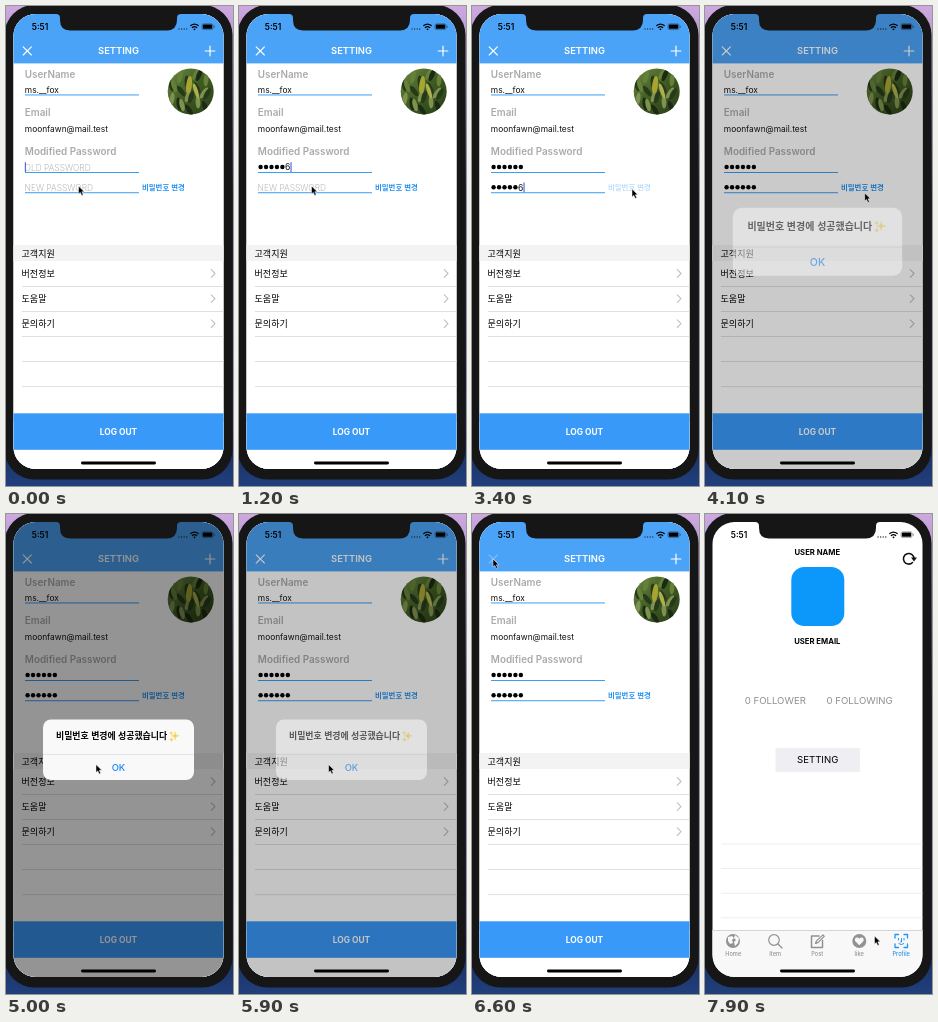
These frames come from a looping animation (227x480 px, 8000 ms). An HTML page:

```html
<!DOCTYPE html>
<html lang="ko">
<head>
<meta charset="utf-8">
<title>Settings screen</title>
<style>
  html, body { margin: 0; width: 100%; height: 100%; overflow: hidden; background: #161617; }
  svg { display: block; width: 100vw; height: 100vh; font-family: Inter, "Noto Sans CJK KR", "Noto Sans CJK", sans-serif; }
  .ko { font-family: "Noto Sans CJK KR", "Noto Sans CJK", "Noto Sans CJK JP", sans-serif; }
  .mid { text-anchor: middle; }
  .line { fill: none; stroke-linecap: round; stroke-linejoin: round; }
</style>
</head>
<body>
<svg id="stage" viewBox="0 0 227 480" xmlns="http://www.w3.org/2000/svg"></svg>
<script>
const LOOP = 8000;
const BLUE = '#2493f3';

// Markup helpers
const rect = (x, y, w, h, fill, extra = '') =>
  `<rect x="${x}" y="${y}" width="${w}" height="${h}" fill="${fill}" ${extra}/>`;
const circle = (x, y, r, fill, extra = '') =>
  `<circle cx="${x}" cy="${y}" r="${r}" fill="${fill}" ${extra}/>`;
const text = (x, y, size, weight, fill, content, cls = '', id = '') =>
  `<text x="${x}" y="${y}" font-size="${size}" font-weight="${weight}" fill="${fill}" class="${cls}" id="${id}">${content}</text>`;
const stroke = (d, color, width, extra = '') =>
  `<path class="line" d="${d}" stroke="${color}" stroke-width="${width}" ${extra}/>`;
const rule = (y, color = '#d2d2d5') => rect(16, y, 202, .7, color);

const fields = [
  { id: 'old', y: 161, hint: 'OLD PASSWORD', firstKey: 300, maskAt: 1700 },
  { id: 'new', y: 181.3, hint: 'NEW PASSWORD', firstKey: 1950, maskAt: 3600 }
];
const KEY_GAP = 150;
const DOT_STEP = 5.45;

function passwordField({ id, y, hint }) {
  const dots = Array.from({ length: 6 }, (_, i) =>
    circle(21.6 + i * DOT_STEP, y, 2.2, '#000', `class="${id}-dot"`)).join('');
  return text(18.6, y + 3.8, 8.4, 300, '#b9b9bc', hint, '', id + '-hint') + dots +
    text(0, y + 3.2, 8.6, 400, '#111', '', '', id + '-digit') +
    rect(19, y + 5, 114, .9, BLUE) +
    rect(0, y - 4.8, 1.1, 9.8, '#4463dc', `id="${id}-caret"`);
}

function avatar() {
  const leaves = Array.from({ length: 22 }, (_, i) => {
    const x = 164 + (i * 17) % 42, y = 65 + (i * 11) % 41;
    const shade = ['#66803a', '#26391a', '#7f9150', '#1b2a12'][i % 4];
    return `<ellipse cx="${x}" cy="${y}" rx="2.4" ry="6.5" fill="${shade}" transform="rotate(${(i * 37) % 80 - 40} ${x} ${y})"/>`;
  }).join('');
  return `<g clip-path="url(#round)">${rect(161, 62, 48, 48, 'url(#foliage)')}${leaves}
    <ellipse cx="183" cy="79" rx="2.8" ry="9" fill="#a8a432" transform="rotate(8 183 79)"/>
    <ellipse cx="190" cy="85" rx="2" ry="8" fill="#aeb04c" transform="rotate(-18 190 85)"/></g>`;
}

function settingScreen() {
  const rows = ['버전정보', '도움말', '문의하기'].map((label, i) => {
    const y = 267.5 + i * 25.1;
    return text(15.6, y + 3.4, 9, 500, '#000', label, 'ko') +
      stroke(`M205.3 ${y - 3.8}l3.7 3.8-3.7 3.8`, '#c0c0c4', 1.1);
  }).join('');
  const rules = Array.from({ length: 5 }, (_, i) => rule(280 + i * 25.1)).join('');
  const label = (y, s) => text(18.8, y, 9.9, 600, '#aaaaac', s);
  return rect(7, 8, 211, 456, '#fff') + rect(7, 8, 211, 49.4, '#4ba3f7') +
    stroke('M17.2 40.8l8.2 8.2M25.4 40.8l-8.2 8.2', '#fff', 1.1, 'id="close"') +
    stroke('M199.2 45h9.6M204 40.2v9.6', '#fff', 1.2) +
    text(112.5, 48.3, 9.4, 600, '#fff', 'SETTING', 'mid') +
    label(71.7, 'UserName') + text(18.8, 87, 8.4, 400, '#111', 'ms.__fox') +
    rect(19, 88.5, 114, .9, BLUE) +
    label(110.3, 'Email') + text(18.8, 126, 8.4, 400, '#111', 'moonfawn@mail.test') +
    label(149, 'Modified Password') + fields.map(passwordField).join('') +
    text(136, 184.3, 7.4, 700, BLUE, '비밀번호 변경', 'ko', 'change') + avatar() +
    rect(7, 239, 211, 16, '#f3f3f3') + text(15.6, 250.6, 9, 500, '#000', '고객지원', 'ko') +
    rows + rules + rect(7, 407.3, 211, 36.5, '#3999f8') +
    text(112.5, 428.9, 8.4, 700, '#fff', 'LOG OUT', 'mid');
}

function tabBar() {
  const gray = '#929294';
  const icons = [
    circle(28, 427, 7, gray) + '<path d="M23 423l4-1 2 2-2 2 1 3-3 1-2-3zM30 421l4 3-1 5-3 3-1-4 2-2-2-2z" fill="#f8f8f8"/>',
    circle(69, 426, 5.3, 'none', `stroke="${gray}" stroke-width="1.2"`) + stroke('M73 430l4 4', gray, 1.4),
    stroke('M114 422h-7.5v11.5h11v-7', gray, 1.5) + stroke('M110.5 429.5l1-2.6 6.5-6 1.3 1.4-6.3 6.3z', gray, 1.2),
    circle(154.3, 427, 7, gray) + '<path d="M154.3 431.2l-4-4c-1.5-3 2-5 4-2.5 2-2.5 5.5-.5 4 2.5z" fill="#f8f8f8"/>',
    stroke('M190 424v-3.5h3.5M199 420.5h3.5v3.5M202.5 430v3.5H199M193.5 433.5H190V430', BLUE, 1.3) +
      stroke('M193.5 424.5v1.5M199 424.5v1.5M196.5 424.5v3.5h-1M193.8 429.7q2.5 2 5 0', BLUE, 1)
  ];
  const labels = ['Home', 'Item', 'Post', 'like', 'Profile'].map((s, i) =>
    text(28.2 + i * 42, 442, 5.7, 500, i === 4 ? BLUE : gray, s, 'mid'));
  return rect(7, 416, 211, 48, '#f8f8f8') + rect(7, 416, 211, .6, '#bcbcbe') + icons.join('') + labels.join('');
}

function profileScreen() {
  const rules = Array.from({ length: 4 }, (_, i) => rule(329.7 + i * 24.6, '#e7e7e9')).join('');
  return rect(7, 8, 211, 456, '#fff') + text(112.3, 40.7, 7.7, 700, '#000', 'USER NAME', 'mid') +
    rect(86.3, 53, 53, 59, '#0c98fb', 'rx="13"') +
    text(112.3, 130, 7.7, 700, '#000', 'USER EMAIL', 'mid') +
    stroke('M207.5 48.5a5.3 5.3 0 1 1 1.5-4', '#111', 1.6) +
    '<path d="M206 43.6h6l-3 4z" fill="#111"/>' +
    text(39.8, 189.8, 9.6, 400, '#8f8f93', '0 FOLLOWER') +
    text(121.6, 189.8, 9.6, 400, '#8f8f93', '0 FOLLOWING') +
    rect(70.5, 234, 84.5, 24, '#efeff3') + text(112.7, 249.3, 9.6, 400, '#000', 'SETTING', 'mid') +
    rules + tabBar();
}

function statusBar() {
  const dots = [0, 1, 2, 3].map(i => circle(173 + i * 2.6, 23, .7, '#26323c')).join('');
  return text(25.8, 23.8, 8.4, 600, '#000', '5:51') + dots +
    stroke('M184.8 19.6q3.7-3 7.4 0', '#000', 1.3) + stroke('M186.3 21.5q2.2-1.8 4.4 0', '#000', 1.2) +
    circle(188.5, 23.3, .9, '#000') +
    rect(196, 17.8, 11, 5.8, 'none', 'rx="1.5" stroke="#000" stroke-opacity=".55" stroke-width=".6"') +
    rect(196.8, 18.6, 9.4, 4.2, '#000', 'rx=".9"') + rect(207.8, 19.7, .8, 2, '#000', 'opacity=".55"');
}

function alertBox() {
  const star = (x, y, r) =>
    `<path d="M${x} ${y - r}Q${x} ${y} ${x + r} ${y}Q${x} ${y} ${x} ${y + r}Q${x} ${y} ${x - r} ${y}Q${x} ${y} ${x} ${y - r}" fill="#f3d04e" stroke="#f3d04e" stroke-width=".5"/>`;
  return rect(37, 205.5, 151, 60.5, '#f9f9f9', 'rx="8"') + rect(37, 240.3, 151, .6, '#d9d9dc') +
    text(50, 225.2, 8.9, 700, '#000', '비밀번호 변경에 성공했습니다', 'ko') +
    star(169.2, 221.8, 3.9) + star(165.2, 219, 1.6) + star(165.4, 225.6, 1.9) +
    text(112.5, 257.2, 9.4, 500, '#1688f8', 'OK', 'mid');
}

const stage = document.getElementById('stage');
stage.innerHTML = `
  <defs>
    <linearGradient id="sky" x2="0" y2="1">
      <stop stop-color="#cda9e0"/><stop offset=".12" stop-color="#a88cc4"/>
      <stop offset=".4" stop-color="#2b2750"/><stop offset=".9" stop-color="#1b2a5c"/><stop offset="1" stop-color="#20407c"/>
    </linearGradient>
    <linearGradient id="foliage" x2="1" y2="1">
      <stop stop-color="#6c8a42"/><stop offset=".5" stop-color="#3e5a20"/><stop offset="1" stop-color="#263b18"/>
    </linearGradient>
    <clipPath id="screen"><rect x="7.5" y="8" width="210" height="455" rx="22"/></clipPath>
    <clipPath id="round"><circle cx="184.7" cy="85.5" r="23"/></clipPath>
  </defs>
  ${rect(0, 0, 227, 480, 'url(#sky)')}
  ${rect(-1.5, -1, 228, 474.5, '#161617', 'rx="30"')}
  <g clip-path="url(#screen)">
    ${profileScreen()}
    <g id="setting">${settingScreen()}</g>
    ${statusBar()}
    ${rect(75, 455.6, 75, 2.8, '#000', 'rx="1.4"')}
    ${rect(7, 8, 211, 456, '#000', 'id="dim"')}
    <g id="alert">${alertBox()}</g>
  </g>
  <path d="M50 7H175V8q-4 0-4 4v2q0 10-10 10.5H64q-10 0-10-10.5v-2q0-4-4-4z" fill="#161617"/>
  <path id="pointer" d="M0 0v8l1.8-1.6 1.4 3 1.5-.7-1.4-2.9h2.5z" fill="#000" stroke="#fff" stroke-width=".5"/>`;

const $ = id => document.getElementById(id);
const clamp = v => Math.min(1, Math.max(0, v));
const span = (t, from, to) => clamp((t - from) / (to - from));
const easeOut = (p, power = 2) => 1 - (1 - p) ** power;
const easeInOut = p => p * p * (3 - 2 * p);
const show = (el, on) => el.setAttribute('visibility', on ? 'visible' : 'hidden');

// Pointer stops: time, x, y
const path = [[0, 72.5, 180], [2800, 72.5, 180], [3300, 160, 183], [3500, 160, 183], [4100, 159.7, 187],
  [4300, 159.7, 187], [4900, 90, 250.5], [6120, 89.5, 250.5], [6520, 21, 45], [6950, 21, 45],
  [7500, 169.5, 422], [LOOP, 169.5, 422]];

function pointerAt(t) {
  const i = path.findIndex(p => t < p[0]);
  const [t0, x0, y0] = path[i - 1], [t1, x1, y1] = path[i];
  const p = easeInOut(span(t, t0, t1));
  return [x0 + (x1 - x0) * p, y0 + (y1 - y0) * p];
}

function drawField({ id, firstKey, maskAt }, t, focused) {
  const count = Math.min(6, Math.max(0, Math.floor((t - firstKey) / KEY_GAP) + 1));
  const plain = count > 0 && t < maskAt;
  show($(id + '-hint'), count === 0);
  document.querySelectorAll(`.${id}-dot`).forEach((dot, i) => show(dot, i < count - (plain ? 1 : 0)));
  const digit = $(id + '-digit');
  digit.textContent = plain ? count : '';
  digit.setAttribute('x', 18.8 + (count - 1) * DOT_STEP);
  const typing = t >= firstKey && t < firstKey + 5 * KEY_GAP + 500;
  const caret = $(id + '-caret');
  caret.setAttribute('x', 18.8 + count * DOT_STEP);
  show(caret, focused && (typing || t % 1000 < 500));
}

function draw(t) {
  const active = t < 1700 ? 'old' : t < 3950 || t >= 6000 ? 'new' : '';
  fields.forEach(f => drawField(f, t, f.id === active));
  $('change').setAttribute('opacity', t >= 3330 && t < 3560 ? .3 : 1);
  $('close').setAttribute('opacity', t >= 6550 && t < 6700 ? .3 : 1);

  // Backdrop and alert share one fade
  const appear = easeOut(span(t, 3980, 4400));
  const fade = appear * (1 - easeOut(span(t, 5800, 6200)));
  $('dim').setAttribute('opacity', .42 * fade);
  $('alert').setAttribute('opacity', fade);
  $('alert').setAttribute('transform', `translate(112.5 236) scale(${1.24 - .24 * appear}) translate(-112.5 -236)`);

  $('setting').setAttribute('transform', `translate(0 ${456 * easeOut(span(t, 6650, 7100), 3)})`);
  $('pointer').setAttribute('transform', `translate(${pointerAt(t)})`);
}

const start = performance.now();
function tick() {
  draw((performance.now() - start) % LOOP);
  requestAnimationFrame(tick);
}
tick();
</script>
</body>
</html>
```
